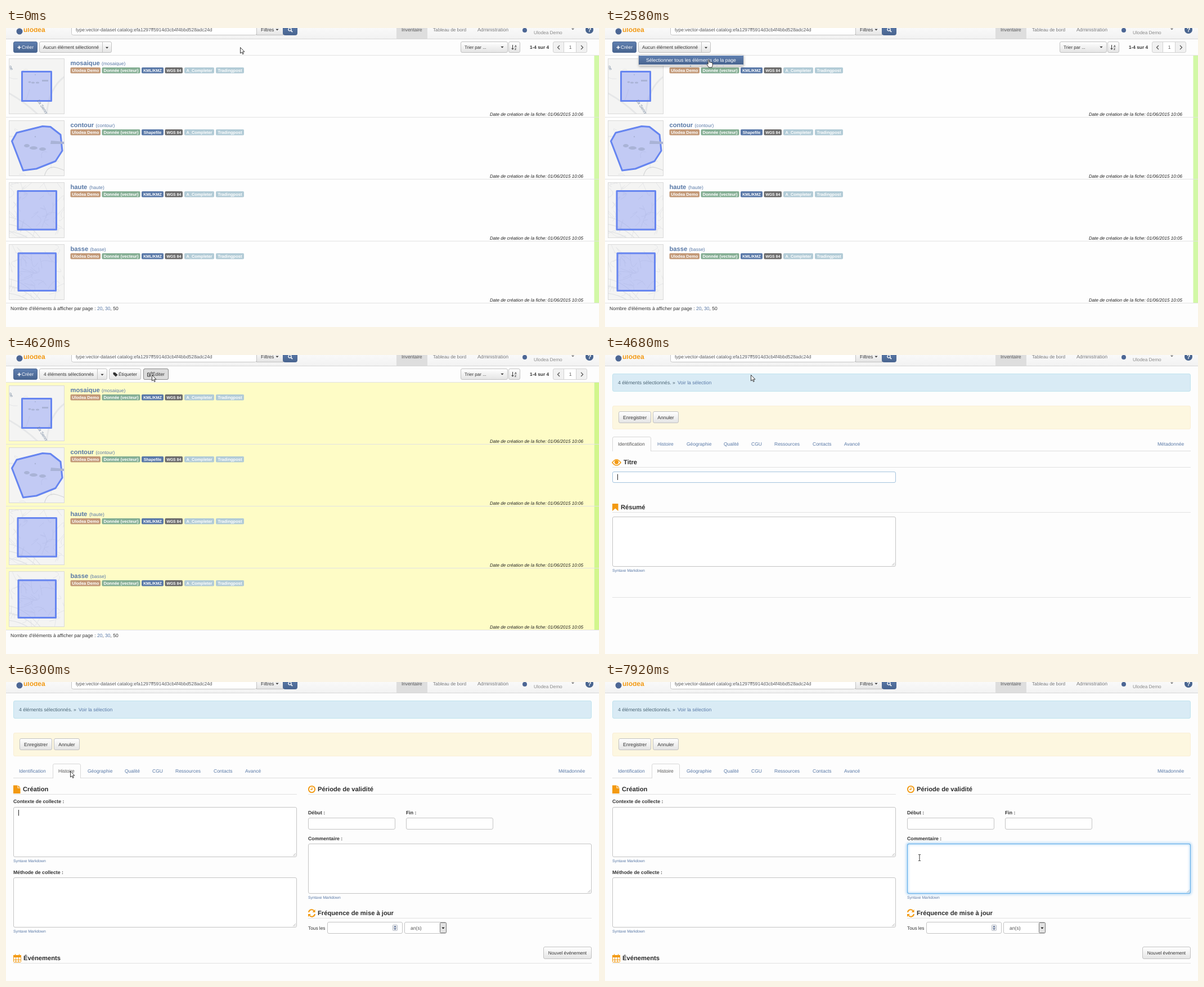
Write an HTML page that moves like this. It is 1054x531 px and loops after 8 s.

```html
<!DOCTYPE html>
<html lang="fr">
<head>
<meta charset="utf-8">
<title>Catalogue</title>
<style>
html, body { margin: 0; width: 100%; height: 100%; overflow: hidden; background: #fdfdfd; }
svg { display: block; width: 100vw; height: 100vh; }
text { font-family: "Liberation Sans", Arial, sans-serif; text-rendering: geometricPrecision; white-space: pre; }
</style>
</head>
<body>
<svg id="stage" viewBox="0 0 1054 531">
  <defs>
    <linearGradient id="grey" x2="0" y2="1"><stop stop-color="#fff"/><stop offset="1" stop-color="#e4e4e4"/></linearGradient>
    <linearGradient id="blue" x2="0" y2="1"><stop stop-color="#5f7fb0"/><stop offset="1" stop-color="#48648f"/></linearGradient>
    <linearGradient id="bar" x2="0" y2="1"><stop stop-color="#f9f9f9"/><stop offset="1" stop-color="#f2f2f2"/></linearGradient>
    <filter id="soft" x="-10%" y="-30%" width="120%" height="160%"><feGaussianBlur stdDeviation="2"/></filter>
  </defs>
</svg>
<script>
const LOOP = 8000, STEP = 60;
const LINK = '#5878a6', INK = '#333', ORANGE = '#f39a12', LINE = '#e2e2e2', BOX = '#c4c4c4';
const stage = document.getElementById('stage');

function el(parent, tag, attrs = {}, content) {
  const node = document.createElementNS('http://www.w3.org/2000/svg', tag);
  for (const key in attrs) node.setAttribute(key, attrs[key]);
  if (content !== undefined) node.textContent = content;
  parent.append(node);
  return node;
}
const group = (parent, attrs) => el(parent, 'g', attrs);
const text = (g, x, y, s, size = 8.5, fill = INK, more = {}) =>
  el(g, 'text', { x, y, 'font-size': size, fill, ...more }, s);
const bold = (g, x, y, s, size, fill = INK, more = {}) =>
  text(g, x, y, s, size, fill, { 'font-weight': 700, ...more });
const rect = (g, x, y, w, h, fill, more = {}) =>
  el(g, 'rect', { x, y, width: w, height: h, fill, ...more });
const frame = (g, x, y, w, h, fill, stroke, rx = 2.5) =>
  rect(g, x + .5, y + .5, w - 1, h - 1, fill, { stroke, rx });
const path = (g, d, fill, stroke = 'none', width = 1, more = {}) =>
  el(g, 'path', { d, fill, stroke, 'stroke-width': width, ...more });
const circle = (g, cx, cy, r, fill, more = {}) => el(g, 'circle', { cx, cy, r, fill, ...more });
const hline = (g, x1, x2, y, stroke = LINE) => path(g, `M${x1} ${y + .5}H${x2}`, 'none', stroke);
const down = (g, x, y, fill = INK) => path(g, `M${x - 2.6} ${y - 1.3}h5.2l-2.6 2.8z`, fill);
const MID = { 'text-anchor': 'middle' };

function button(g, x, y, w, h, label, size = 8.4) {
  frame(g, x, y, w, h, 'url(#grey)', '#c2c2c2');
  if (label) text(g, x + w / 2, y + h / 2 + 3, label, size, INK, MID);
}

// Header shared by both screens
const nav = group(stage);
rect(nav, 0, 0, 1054, 19, 'url(#bar)');
hline(nav, 0, 1054, 19, '#d6d6d6');
circle(nav, 24, 6, 5.5, '#4c6694');
bold(nav, 31, 7, 'ulodea', 12, ORANGE);
frame(nav, 116, -8, 330, 21, '#fff', '#c6c6c6', 3);
text(nav, 124, 6, 'type:vector-dataset catalog:efa1297ff5914d3cb4f4bbd528adc24d', 8.42, '#555');
frame(nav, 445, -8, 48, 21, 'url(#grey)', '#c2c2c2', 0);
text(nav, 453, 6, 'Filtres', 8.6);
down(nav, 482, 3);
frame(nav, 492, -8, 26, 21, 'url(#blue)', '#4d6893', 3);
circle(nav, 504.5, 2.5, 2.6, 'none', { stroke: '#fff', 'stroke-width': 1.3 });
path(nav, 'M506.5 4.5l2.6 2.6', 'none', '#fff', 1.6);
rect(nav, 694, 0, 55, 19, '#dedede');
text(nav, 703, 6, 'Inventaire', 8.4, '#555');
text(nav, 759, 6, 'Tableau de bord', 8.24, '#777');
text(nav, 838, 6, 'Administration', 8.7, '#777');
circle(nav, 922, 4, 4, '#4c6694');
text(nav, 938, 11, 'Ulodea Demo', 8.3, '#888');
down(nav, 1007.5, 2, '#777');
circle(nav, 1037, 3, 7, '#48648f');
bold(nav, 1037, 7, '?', 11, '#fff', MID);

// List screen
const list = group(stage);
hline(list, 0, 1054, 48, LINE);
frame(list, 13, 24, 43, 20, 'url(#blue)', '#4d6893');
path(list, 'M20.5 34.5h6M23.5 31.5v6', 'none', '#fff', 1.7);
text(list, 28, 37, 'Créer', 8.4, '#fff');
button(list, 808, 24, 84, 20);
text(list, 815, 37, 'Trier par ...', 8);
down(list, 882, 34);
button(list, 893, 24, 21, 20);
path(list, 'M900.5 30v8m-2 -2.2l2 2.4l2 -2.4', 'none', INK, 1);
bold(list, 904, 34, 'A', 5);
bold(list, 904, 39, 'Z', 5);
bold(list, 931, 37, '1-4 sur 4', 8.27);
frame(list, 972, 24, 61, 20, '#f1f1f1', '#d2d2d2');
frame(list, 991, 24, 23, 20, '#fff', '#d2d2d2', 0);
path(list, 'M984 31l-3.5 3.5l3.5 3.5M1022 31l3.5 3.5l-3.5 3.5', 'none', '#555', 1.3);
text(list, 1003, 37, '1', 8.4, '#555', MID);

const noSel = group(list);
button(noSel, 59, 24, 129, 20);
text(noSel, 66, 37, 'Aucun élément sélectionné', 8.25);
path(noSel, 'M171.5 25v18', 'none', '#c2c2c2');
down(noSel, 179.5, 35);
const caretShade = rect(noSel, 172, 25, 16, 19, '#000', { rx: 2 });

const sel = group(list);
button(sel, 59, 24, 121, 20);
text(sel, 67, 37, '4 éléments sélectionnés', 8.3);
path(sel, 'M162.5 25v18', 'none', '#c2c2c2');
down(sel, 171, 35);
button(sel, 183, 24, 57, 20);
path(sel, 'M190.5 31h3.5l4.5 4.2l-3.4 3.4l-4.6 -4.4z', INK);
text(sel, 200, 37, 'Étiqueter', 8.25);
button(sel, 244, 24, 45, 20);
const editPress = frame(sel, 244, 24, 45, 20, '#dcdcdc', '#8c8c8c');
path(sel, 'M256.5 35v3h-5v-6h3.5M254 36l.4 -1.8l4.2 -4l1.4 1.4l-4.2 4z', 'none', INK, 1);
text(sel, 260, 37, 'Éditer', 8.4);

function random(seed) {
  return () => (seed = (seed * 16807) % 2147483647) / 2147483647;
}

// Pale street map of short bent streets; more of them for a town
function map(g, seed, streets) {
  const rnd = random(seed);
  const shift = () => ((rnd() - .5) * 44).toFixed(1);
  for (let i = 0; i < streets; i++) {
    const from = `${(rnd() * 98).toFixed(1)} ${(rnd() * 98).toFixed(1)}`;
    path(g, `M${from}q${shift()} ${shift()} ${shift()} ${shift()}`, 'none', '#e5e6e8');
  }
  for (let i = 0; i < 3 && streets > 9; i++) {
    path(g, `M-5 ${60 + i * 13}Q30 ${64 + i * 12} 60 ${104 + i * 8}`, 'none', '#e0e2e4', 1.2);
  }
}
function blobs(g, items) {
  for (const [cx, cy, rx, ry] of items) el(g, 'ellipse', { cx, cy, rx, ry, fill: '#a9b3d6' });
}
const square = (x, y, s) => `M${x} ${y}h${s}v${s}h${-s}z`;
const ROWS = [
  { name: 'mosaique', sub: 170, type: 'KML/KMZ', time: '10:06', seed: 71, streets: 4, area: square(22.5, 22.5, 52) },
  { name: 'contour', sub: 159.5, type: 'Shapefile', time: '10:06', seed: 25, streets: 5,
    area: 'M4.5 36L13 21L59 9.500L73 10.500L91 24.500L94 53L82 71.500L48 85L24.500 88z' },
  { name: 'haute', sub: 148, type: 'KML/KMZ', time: '10:05', seed: 913, streets: 40, area: square(15, 14.5, 68.5) },
  { name: 'basse', sub: 149.5, type: 'KML/KMZ', time: '10:05', seed: 447, streets: 40, area: square(16, 15, 66.5) }
];
const TAGS = [
  [114.5, 53.5, '#c39a79', 'Ulodea Demo', 7.5], [170.5, 68, '#86af95', 'Donnée (vecteur)', 7.6],
  [241, 39, '#5a79a8', '', 7.1], [282.5, 31.5, '#6c6c6c', 'WGS 84', 6.9],
  [317, 53, '#b3ccd7', 'A_Completer', 7.4], [373, 50, '#b3ccd7', 'Tradingpost', 7.5]
];
const fills = [], bars = [], firstTitle = [];
let thumbEdge;
const clip = el(el(stage, 'defs'), 'clipPath', { id: 'thumb' });
rect(clip, 0, 0, 97, 97, '#000');

ROWS.forEach((row, i) => {
  const g = group(list, { transform: `translate(0 ${110 * i})` });
  fills.push(rect(g, 0, 49, 1045, 109, '#fefefe'));
  bars.push(rect(g, 1045.5, 49, 8.5, 109, '#d2f8a6'));
  hline(g, 0, 1054, 158, LINE);
  frame(g, 5, 54, 99, 99, '#f4f4f3', '#d9d9d9', 0);
  const art = group(g, { transform: 'translate(6 55)', 'clip-path': 'url(#thumb)' });
  map(art, row.seed, row.streets);
  if (i === 0) path(art, 'M-2 60Q30 78 52 100M66 100Q70 50 100 30', 'none', '#e6e7e8', 3);
  if (i === 1) path(art, 'M62 100Q66 78 84 83T100 92', 'none', '#d4d5d6', 1.2);
  path(art, row.area, '#7f93f4', '#6685f0', 3, { 'fill-opacity': .43, 'stroke-linejoin': 'round' });
  if (i === 0) {
    blobs(art, [[36, 41, 2.5, 1.5], [42, 42, 3, 1.5], [50, 42, 3, 1.5], [46, 28, 1, 1]]);
    rect(art, 58, 37, 11, 3, '#a9b3d6');
    const place = { 'font-style': 'italic' };
    text(art, 0, 0, 'La Senne', 7.5, '#7688a0', { ...place, transform: 'translate(49 74) rotate(58)' });
    text(art, 0, 0, 'ne', 7.5, '#7688a0', { ...place, transform: 'translate(-1 13) rotate(65)' });
  }
  if (i === 1) {
    blobs(art, [[31, 44, 5, 3], [43, 48, 7, 3], [59, 50, 6, 3], [46, 28, 1.2, 1.2]]);
    path(art, 'M74 35l24 2v4l-25 0z', '#a9b3d6');
  }
  if (!i) thumbEdge = rect(g, 99, 54, 6, 100, '#f1eeba');
  const name = bold(g, 114.5, 65.5, row.name, 11.2, LINK);
  const sub = text(g, row.sub, 65.5, `(${row.name})`, 8.45, LINK);
  if (!i) firstTitle.push(name, sub);
  for (const [x, w, fill, label, size] of TAGS) {
    rect(g, x, 70, w, 10.5, fill, { rx: 1.8 });
    bold(g, x + w / 2, 77.8, label || row.type, size, '#fff', MID);
  }
  text(g, 1026, 155.5, `Date de création de la fiche: 01/06/2015 ${row.time}`, 8.1, '#222',
    { 'font-style': 'italic', 'text-anchor': 'end' });
});
const pages = text(list, 8, 501, "Nombre d'éléments à afficher par page : ", 8.52);
for (const [s, fill] of [['20', LINK], [', ', INK], ['30', LINK], [', 50', INK]]) el(pages, 'tspan', { fill }, s);

const menu = group(list);
rect(menu, 60, 49, 187, 20, '#000', { opacity: .25, filter: 'url(#soft)' });
frame(menu, 59, 47, 188, 20, '#fff', '#cfcfcf', 3);
const menuHot = rect(menu, 60, 49, 186, 16, 'url(#blue)');
const menuText = text(menu, 73, 60, 'Sélectionner tous les éléments de la page', 8.62);

// Form screen
const form = group(stage);
frame(form, 13, 33, 1028, 32, '#d9ebf5', '#bfe3ee');
text(form, 23, 52, '4 éléments sélectionnés. »', 8.6, '#4a6474');
text(form, 129, 52, 'Voir la sélection', 8.6, LINK);
frame(form, 13, 90, 1028, 42, '#fdf7e0', '#faeed6');
button(form, 24, 100, 58, 21, 'Enregistrer', 8.6);
button(form, 85, 100, 46, 21, 'Annuler', 8.5);
const tabHover = path(form, 'M83 170v-22q0 -3 3 -3h44q3 0 3 3v22z', '#ededed');
hline(form, 13, 1041, 170, '#dcdcdc');
const tab = (x, w) => path(form, `M${x + .5} 171v-23q0 -2.5 2.5 -2.5h${w - 6}q2.5 0 2.5 2.5v23`, '#fdfdfd', '#d8d8d8');
const tabs = [tab(13, 69), tab(83, 50)];
const tabTexts = [['Identification', 23], ['Histoire', 93], ['Géographie', 145], ['Qualité', 211], ['CGU', 260],
  ['Ressources', 301], ['Contacts', 369], ['Avancé', 425], ['Métadonnée', 982]]
  .map(([s, x]) => text(form, x, 161, s, 8.5, LINK));

const head = (g, x, y, s) => bold(g, x, y + 4, s, 11.2, '#2b2b2b');
const label = (g, x, y, s) => bold(g, x, y + 3, s, 8.75);
function field(g, x, y, w, h, area) {
  frame(g, x, y, w, h, '#fff', BOX);
  if (!area) return;
  const cx = x + w - 2, cy = y + h - 2;
  path(g, `M${cx - 5} ${cy}l5 -5M${cx - 2.5} ${cy}l2.5 -2.5`, 'none', '#aaa', .8);
  text(g, x, y + h + 8.5, 'Syntaxe Markdown', 6.8, LINK);
}
function glow(g, x, y, w, h) {
  const wrap = group(g);
  rect(wrap, x, y, w, h, 'none', { stroke: '#52a8ec', 'stroke-width': 3, opacity: .55, filter: 'url(#soft)', rx: 3 });
  frame(wrap, x, y, w, h, 'none', '#5cabea');
  return wrap;
}
const beam = (g, x, y) => rect(g, x, y, 1, 10.5, '#222');

const ident = group(form);
path(ident, 'M13 191Q20.5 180.5 28 191Q20.5 201 13 191z', 'none', ORANGE, 1.5);
circle(ident, 20.5, 190.3, 3.6, ORANGE);
head(ident, 33, 190, 'Titre');
hline(ident, 13, 1041, 199);
frame(ident, 13, 207, 504, 20, '#fff', '#a3c3de');
const titleCaret = beam(ident, 22, 211.5);
path(ident, 'M13 264h10.5v13l-5.2 -4.5l-5.3 4.5z', ORANGE);
head(ident, 28, 269.5, 'Résumé');
hline(ident, 13, 1041, 279);
field(ident, 13, 287, 504, 89, true);
hline(ident, 13, 1041, 430);

const hist = group(form);
path(hist, 'M13 183.5h7.5v5h5v9.5h-12.5zM21.5 183.5l4 4h-4z', ORANGE);
head(hist, 30, 190, 'Création');
hline(hist, 13, 517, 199);
label(hist, 13, 212, 'Contexte de collecte :');
field(hist, 13, 222, 504, 89, true);
const contextGlow = glow(hist, 13, 222, 504, 89);
const contextCaret = beam(hist, 22, 227);
label(hist, 13, 337.5, 'Méthode de collecte :');
field(hist, 13, 347, 504, 89, true);
circle(hist, 543.5, 190.5, 5.6, 'none', { stroke: ORANGE, 'stroke-width': 1.9 });
path(hist, 'M544 187v4h-3', 'none', ORANGE, 1.3);
head(hist, 554, 190, 'Période de validité');
hline(hist, 537, 1041, 199);
label(hist, 537, 232, 'Début :');
field(hist, 537, 241, 155, 21);
label(hist, 711, 232, 'Fin :');
field(hist, 711, 241, 155, 21);
label(hist, 537, 277.5, 'Commentaire :');
field(hist, 537, 287, 504, 89, true);
const commentGlow = glow(hist, 537, 287, 504, 89);
const commentCaret = beam(hist, 545, 292);
path(hist, 'M538 409a5.3 5.3 0 0 1 9.5 -2.5M549 412a5.3 5.3 0 0 1 -9.5 2.5', 'none', ORANGE, 2);
path(hist, 'M549.5 404v5h-5zM537 417v-5h5z', ORANGE);
head(hist, 554, 410, 'Fréquence de mise à jour');
hline(hist, 537, 1041, 419);
text(hist, 537, 439.5, 'Tous les', 8.3);
field(hist, 571, 426, 134, 21);
frame(hist, 687, 431, 9, 11, '#eee', '#b5bcc8', 1);
path(hist, 'M689 435.5l2.5 -2.5l2.5 2.5zM689 437.5l2.5 2.5l2.5 -2.5z', '#3e5786');
field(hist, 708, 426, 75, 21);
text(hist, 719, 439.5, 'an(s)', 8.6, '#555');
frame(hist, 771, 427, 12, 19, '#e2e2e2', '#777', 1);
down(hist, 777, 437, '#111');
button(hist, 955, 470, 86, 22, 'Nouvel événement', 8.2);
frame(hist, 13, 485, 14, 13, 'none', ORANGE, 1);
rect(hist, 13, 485, 14, 4, ORANGE);
path(hist, 'M16.5 483v4M23.5 483v4M13 493.5h14M17.5 489v8.5M22.5 489v8.5', 'none', ORANGE);
head(hist, 31, 490, 'Événements');
hline(hist, 13, 1041, 499);

// Pointer shapes, hot spot at 0,0
const pointer = group(stage);
const shapes = {
  arrow: path(pointer, 'M.5 .5v10.5l2.5 -2.2l1.7 3.7l1.6 -.7l-1.7 -3.6h3.3z', '#fff', '#222', .9),
  hand: path(pointer, 'M-.8 7V1Q.2 -.5 1.2 1v4q2 -.9 2.2 .3q2 -.6 2.2 .6q1.6 -.4 1.6 1v3.5q-.4 2 -1.4 3.6h-5.2q-2 -3 -3.8 -5.5q.4 -1.5 2.4 -.3z', '#fff', '#222', .9),
  text: path(pointer, 'M-2 -5.5h1.5l.5 .5l.5 -.5h1.5M0 -5v10M-2 5.5h1.5l.5 -.5l.5 .5h1.5', 'none', '#333', 1)
};

const MOVES = [
  [0, 416, 34], [60, 416, 34], [180, 398, 48], [300, 383, 80], [420, 420, 108], [540, 491, 104], [660, 440, 95],
  [720, 412, 92], [840, 412, 92], [1140, 330, 76], [1440, 205, 48], [1680, 180, 43], [1800, 180, 43],
  [2100, 184, 56], [2760, 184, 56], [3180, 215, 43], [3600, 246, 37], [3900, 259, 35], [4920, 259, 35],
  [5100, 281, 58], [5400, 235, 130], [5760, 138, 168], [6060, 114, 158], [6300, 114, 158], [6660, 330, 232],
  [6900, 500, 290], [7080, 559, 312], [LOOP, 559, 312]
];
const SHAPES = [[0, 'arrow'], [1980, 'hand'], [2940, 'arrow'], [5640, 'hand'], [6300, 'arrow'], [6600, 'text']];

function position(t) {
  const i = MOVES.findIndex(m => m[0] > t);
  const [t0, x0, y0] = MOVES[i - 1], [t1, x1, y1] = MOVES[i];
  const k = (t - t0) / (t1 - t0);
  return [x0 + (x1 - x0) * k, y0 + (y1 - y0) * k];
}
const ramp = (t, from, to) => Math.max(0, Math.min(1, (t - from) / (to - from)));
const show = (node, on) => node.setAttribute('display', on ? 'inline' : 'none');
const fade = (node, value) => node.setAttribute('opacity', value);
const fill = (node, color) => node.setAttribute('fill', color);

function draw(t) {
  const picked = t >= 2640, editing = t >= 4680, second = t >= 6300;
  const [x, y] = position(t);
  const hover = picked && !editing && y >= 49;

  show(list, !editing);
  show(form, editing);
  show(noSel, !picked);
  show(sel, picked);
  fade(caretShade, t < 1560 ? 0 : .14 * (1 - ramp(t, 2220, 2400)));
  fade(editPress, .3 * ramp(t, 3420, 3600) + .7 * ramp(t, 4260, 4440));
  fills.forEach((f, i) => fill(f, !picked ? '#fefefe' : hover && !i ? '#f1eeba' : '#fefcc6'));
  bars.forEach((b, i) => fill(b, !picked ? '#d2f8a6' : hover && !i ? '#caf088' : '#d2f68c'));
  firstTitle.forEach(n => fill(n, hover ? '#2f4563' : LINK));
  show(thumbEdge, hover);

  const hot = t >= 1980;
  show(menu, t >= 1620 && !picked);
  show(menuHot, hot);
  fill(menuText, hot ? '#fff' : INK);

  show(ident, !second);
  show(hist, second);
  show(tabs[0], !second);
  show(tabs[1], second);
  show(tabHover, t >= 5700 && !second);
  fill(tabTexts[0], second ? LINK : '#555');
  fill(tabTexts[1], second ? '#555' : LINK);
  show(titleCaret, (t - 4680) % 1080 < 540);
  show(contextCaret, t < 6840);
  show(commentCaret, t >= 7380 && t < 7920);
  fade(contextGlow, ramp(t, 6300, 6480) - ramp(t, 7140, 7320));
  fade(commentGlow, ramp(t, 7140, 7320));

  const shape = SHAPES.filter(s => s[0] <= t).pop()[1];
  for (const key in shapes) show(shapes[key], key === shape);
  pointer.setAttribute('transform', `translate(${x.toFixed(1)} ${y.toFixed(1)})`);
}

const start = performance.now();
function tick() {
  const t = (performance.now() - start) % LOOP;
  draw(Math.floor(t / STEP) * STEP);
  requestAnimationFrame(tick);
}
tick();
</script>
</body>
</html>
```
